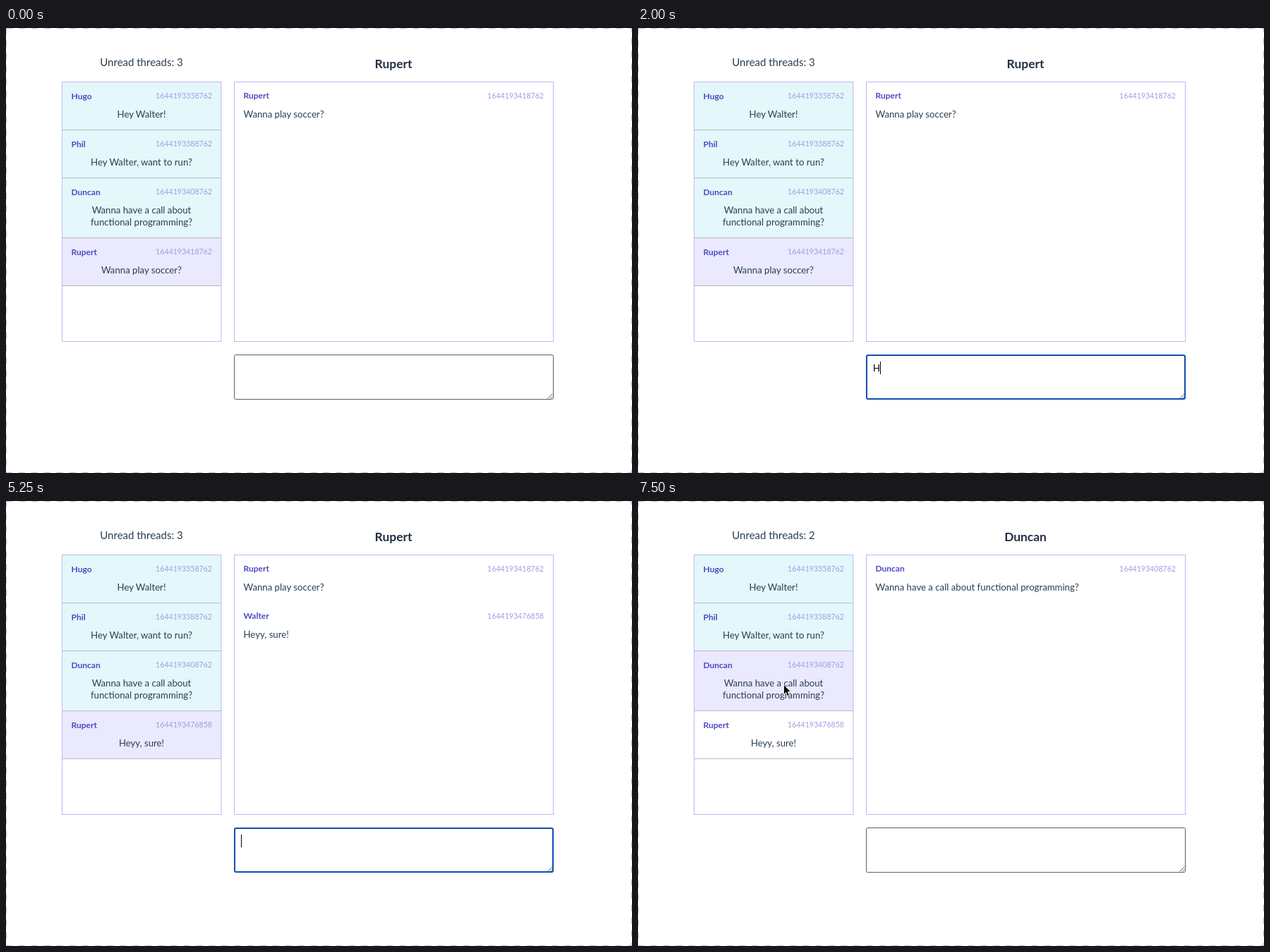
An HTML page for the animation above (8000 ms loop, 887 px wide and 631 px high).

```html
<!DOCTYPE html>
<html lang="en">
<head>
<meta charset="utf-8">
<title>Chat threads</title>
<style>
  html, body { margin: 0; width: 100%; height: 100%; overflow: hidden; background: #fff; }
  svg { display: block; width: 887px; height: 631px; }
  text { font: 13.2px Lato, sans-serif; fill: #2c3e50; white-space: pre; }
  .count { font-size: 15px; }
  .title { font-size: 17.4px; font-weight: 700; fill: #213043; }
  .name { font-size: 12px; font-weight: 700; fill: #4c4ac2; }
  .stamp { font-size: 10.6px; fill: #a09ee2; }
  .draft { font-size: 13px; fill: #000; }
  .mid { text-anchor: middle; }
  .end { text-anchor: end; }
  .panel { fill: none; stroke: #bdb9f4; }
  .rule { stroke: #bbb9c6; }
</style>
</head>
<body>
<svg viewBox="0 0 887 631">
  <rect x=".5" y=".5" width="886" height="630" fill="none" stroke="#b9b9b9" stroke-dasharray="9 9"/>
  <g id="view"></g>
  <rect class="panel" x="79.5" y="76.5" width="225.5" height="368"/>
  <rect class="panel" x="323.5" y="76.5" width="452" height="368"/>
  <rect id="box" fill="#fff" rx="2"/>
  <path d="M767.5 525.5l7-7M771.5 525.5l3-3" stroke="#555" stroke-width=".9"/>
  <text id="draft" class="draft" x="333" y="486.5"></text>
  <path id="typo" d="M334 489.5H358" stroke="#ee3b3b" stroke-width="2.2" stroke-linecap="round" stroke-dasharray="0 3.9"/>
  <rect id="caret" y="473" width="1" height="18"/>
  <g id="mouse">
    <path d="M.5 1.5V15L3.6 12.2L5.9 17.4L8.3 16.4L6.1 11.3H10.2Z" opacity=".18"/>
    <path d="M0 0V13.8L3.2 11L5.4 16.2L7.9 15.1L5.7 10.1H10Z" stroke="#fff" stroke-width=".9"/>
  </g>
</svg>
<script>
const LOOP = 8000, TICK = 250;
const FOCUS = 1000, TYPE = 2000, WORD = 3500, SEND = 5000, LEAVE = 5750, SELECT = 7000;
const GREETING = "Heyy, ", WORDS = "sure!", REPLY = GREETING + WORDS;
const ASK = "Wanna play soccer?";
const CALL = ["Wanna have a call about", "functional programming?"];
const SENT = "1644193418762", REPLIED = "1644193476858", CALLED = "1644193408762";

const $ = id => document.getElementById(id);
const clamp = u => Math.min(1, Math.max(0, u));
const lerp = (a, b, u) => a + (b - a) * u;
const easeOut = (u, power) => 1 - (1 - u) ** power;
const smooth = u => u * u * u * (u * (6 * u - 15) + 10);

function set(el, attrs) {
  for (const k in attrs) el.setAttribute(k, attrs[k]);
}
const show = (el, on) => set(el, { visibility: on ? "visible" : "hidden" });

// One key per tick for the greeting, then a quick burst that slows down.
function typedCount(t) {
  if (t < TYPE || t >= SEND) return 0;
  const greeting = Math.min(GREETING.length, 1 + (t - TYPE) / TICK);
  const burst = easeOut(clamp((t - WORD) / 1000), 2);
  return greeting + Math.floor(WORDS.length * burst + .3);
}

// The caret stays lit while typing and otherwise blinks from the last input.
function caretOn(t) {
  if (t < FOCUS - TICK || t >= SELECT) return false;
  const last = t < TYPE ? FOCUS : Math.min(t, SEND);
  return (t - last) % 1000 < 500;
}

function mouseAt(t) {
  if (t < TYPE) {
    const u = clamp((t - TICK) / 500);
    return [lerp(363, 380, u) + 30 * Math.sin(Math.PI * u), lerp(402, 493.5, easeOut(u, 4))];
  }
  const u = smooth(clamp((t - LEAVE) / 1000));
  return [lerp(380, 206.5, u), lerp(493.5, 260.5, u)];
}

const label = (cls, x, y, s) => `<text class="${cls}" x="${x}" y="${y}">${s}</text>`;
const heading = (left, right, y, name, stamp) =>
  label("name", left, y, name) + label("stamp end", right, y - .5, stamp);

function threadList(page) {
  const threads = [
    ["Hugo", "1644193358762", ["Hey Walter!"]],
    ["Phil", "1644193388762", ["Hey Walter, want to run?"]],
    ["Duncan", CALLED, CALL],
    ["Rupert", page ? REPLIED : SENT, [page ? REPLY : ASK]]
  ];
  const open = page === 2 ? 2 : 3;
  let top = 77;
  return threads.map(([name, stamp, lines], i) => {
    const y = top, height = 51 + 17 * lines.length;
    const fill = i === open ? "#eae9fe" : i === 3 ? "#fff" : "#e4f7fa";
    top += height;
    return `<rect x="80" y="${y}" width="225" height="${height}" fill="${fill}"/>` +
      `<path class="rule" d="M80 ${top - .5}h225"/>` +
      heading(92.5, 292, y + 23.5, name, stamp) +
      lines.map((s, n) => label("mid", 192, y + 50 + n * 17.3, s)).join("");
  }).join("");
}

function conversation(page) {
  const messages = page === 2
    ? [["Duncan", CALLED, CALL.join(" ")]]
    : [["Rupert", SENT, ASK], ["Walter", REPLIED, REPLY]].slice(0, page + 1);
  return label("title mid", 549, 57, messages[0][0]) +
    messages.map(([name, stamp, s], i) => {
      const y = 100.3 + 67 * i;
      return heading(336.5, 762, y, name, stamp) + label("", 336.5, y + 26.7, s);
    }).join("");
}

function drawBox(t) {
  const level = t >= SELECT ? 0 : clamp((t - FOCUS + 2 * TICK) / (2 * TICK));
  const w = 1 + level;
  set($("box"), {
    x: 323 + w / 2, y: 463 + w / 2, width: 453 - w, height: 64 - w, "stroke-width": w,
    stroke: level === 0 ? "#5f5f5f" : level < 1 ? "#2b62b8" : "#124fb4"
  });
}

function draw(t) {
  const page = t >= SELECT ? 2 : t > SEND ? 1 : 0;
  $("view").innerHTML = label("count mid", 192, 54, "Unread threads: " + (page === 2 ? 2 : 3)) +
    threadList(page) + conversation(page);
  drawBox(t);

  const typed = typedCount(t);
  $("draft").textContent = REPLY.slice(0, typed);
  show($("typo"), typed >= GREETING.length);
  show($("caret"), caretOn(t));
  set($("caret"), { x: Math.round(333 + (typed ? $("draft").getComputedTextLength() : 0)) });

  show($("mouse"), t > 0 && t < TYPE || t > LEAVE);
  set($("mouse"), { transform: `translate(${mouseAt(t)})` });
}

const begin = performance.now();
let drawn = -1;
function frame() {
  const t = Math.floor((performance.now() - begin) % LOOP / TICK) * TICK;
  if (t !== drawn) draw(drawn = t);
  requestAnimationFrame(frame);
}
frame();
</script>
</body>
</html>
```
